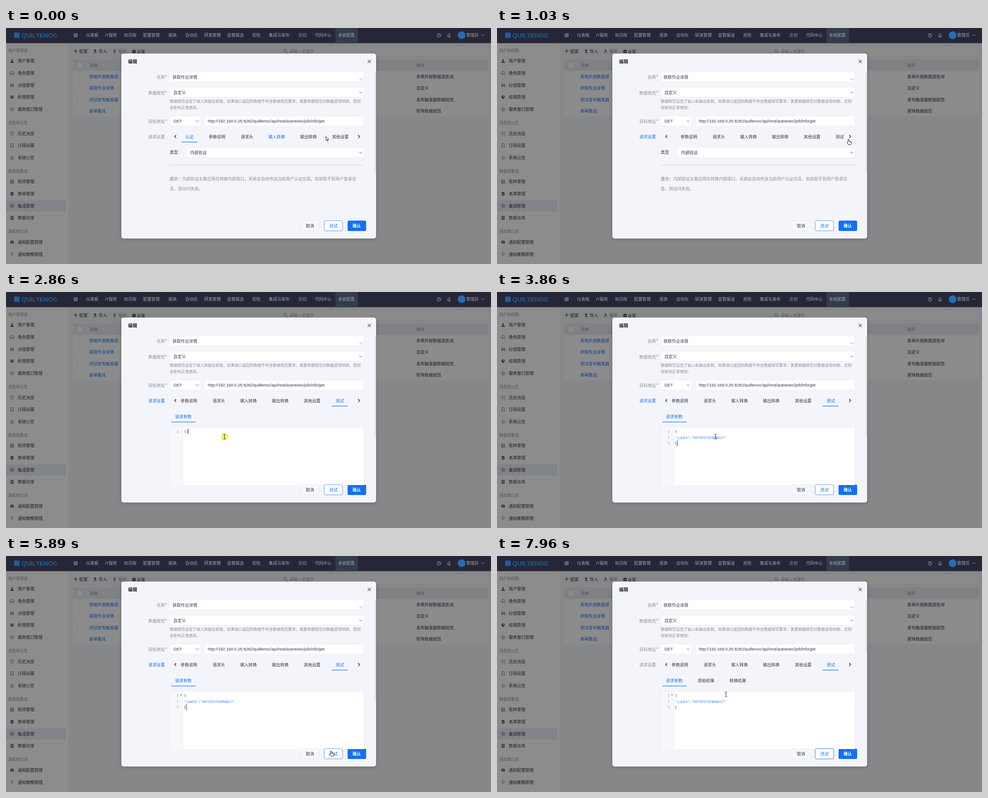
These frames come from a looping animation (1072 by 522 pixels, 8 s). An HTML page:

```html
<!DOCTYPE html>
<html lang="zh">
<head>
<meta charset="utf-8">
<style>
html, body { margin: 0; width: 100%; height: 100%; overflow: hidden; }
svg { display: block; width: 1072px; height: 522px; }
text { font-family: "Liberation Sans", "Noto Sans CJK SC", "Noto Sans CJK", sans-serif; white-space: pre; }
.mono { font-family: "DejaVu Sans Mono", monospace; }
</style>
</head>
<body>
<svg viewBox="0 0 1072 522">
  <defs>
    <filter id="shadow" x="-10%" y="-10%" width="120%" height="120%">
      <feDropShadow dx="0" dy="2" stdDeviation="4" flood-opacity=".2"/>
    </filter>
    <clipPath id="tabClip"><rect x="384.5" y="228" width="385" height="28"/></clipPath>
  </defs>
  <g id="backdrop"></g>
  <g id="live"></g>
</svg>
<script>
const LOOP = 8000, BLUE = '#1670f0', INK = '#33363c', GRAY = '#8b8e95', DIM = '#1c1d20';

// Drawing helpers; text is placed by its left edge and vertical middle
const text = (x, y, str, fill = INK, size = 9.17, extra = '') =>
  `<text x="${x}" y="${y + size * .37}" font-size="${size}" fill="${fill}" ${extra}>${str}</text>`;
const rect = (x, y, w, h, fill, r = 0, extra = '') =>
  `<rect x="${x}" y="${y}" width="${w}" height="${h}" rx="${r}" fill="${fill}" ${extra}/>`;
const line = (d, stroke, width = 1) =>
  `<path d="${d}" fill="none" stroke="${stroke}" stroke-width="${width}"/>`;
const shape = (d, fill, extra = '') => `<path d="${d}" fill="${fill}" ${extra}/>`;
const circle = (x, y, r, fill, extra = '') => `<circle cx="${x}" cy="${y}" r="${r}" fill="${fill}" ${extra}/>`;
const at = (x, y, body) => `<g transform="translate(${x} ${y})">${body}</g>`;
const fade = (opacity, body) => opacity > 0 ? `<g opacity="${opacity}">${body}</g>` : '';
const field = (x, y, w) => rect(x, y, w, 22.5, '#fff', 3, 'stroke="#e6e8ef" stroke-width=".7"');
const down = (x, y, color = '#555') => line(`M${x - 3} ${y - 1.5}l3 3 3-3`, color);
const bold = 'font-weight="bold"';

// Timing helpers
const ramp = (t, from, to) => Math.min(1, Math.max(0, (t - from) / (to - from)));
const ease = k => k < .5 ? 2 * k * k : 1 - 2 * (1 - k) ** 2;
const during = (t, from, to) => t >= from && t < to;
const mix = (a, b, k) => `color-mix(in srgb, ${a}, ${b} ${k * 100}%)`;

const dots = [-4, -1, 2].map(y => [-4, -1, 2].map(x => `M${x} ${y}h2v2h-2z`).join('')).join('');
const bell = 'M-3.3 2.4C-2 1-2.6-3.5 0-3.5S2 1 3.3 2.4zM-1 4H1';
const ring = r => `M${-r} 0a${r} ${r} 0 1 0 ${2 * r} 0a${r} ${r} 0 1 0 ${-2 * r} 0`;
const solid = d => shape(d, '#34363a');
const outline = d => line(d, '#34363a', .9);

const menu = [
  ['用户和权限'],
  ['用户管理', solid('M-1.9-2a1.9 1.9 0 1 0 3.8 0a1.9 1.9 0 1 0-3.8 0M-4 4c0-5 8-5 8 0z')],
  ['角色管理', outline('M-4 2.5a2 2 0 0 1 1-3.5a3 2.6 0 0 1 6 0a2 2 0 0 1 1 3.5zM-1.5 2.5a1.5 1.5 0 0 1 3 0')],
  ['分组管理', solid('M-3.5-1.5a1.4 1.4 0 1 0 2.8 0a1.4 1.4 0 1 0-2.8 0M.7-1.5a1.4 1.4 0 1 0 2.8 0a1.4 1.4 0 1 0-2.8 0M-4.5 3c0-3.5 4.2-3.5 4.2 0zM.3 3c0-3.5 4.2-3.5 4.2 0z')],
  ['权限管理', solid('M0-4L3.5-2.7V0C3.5 2 2 3.3 0 4C-2 3.3-3.5 2-3.5 0V-2.7z') + shape('M0-2.5L2.3-1.7V0H0z', '#8c8c8c')],
  ['服务窗口管理', outline(ring(3.8) + 'M0-2.2V.3L1.5 1.5')],
  ['消息和公告'],
  ['历史消息', outline('M-4-3H4M-4 0H-1M-4 3H-1M.5 2.5L4-.5M1 4H4')],
  ['订阅设置', outline('M-2.8-3.8H2.8V3.8L0 2-2.8 3.8z')],
  ['系统公告', outline(bell)],
  ['数据和集成'],
  ['矩阵管理', solid(dots)],
  ['表单管理', solid('M-3.2-4H1L3.2-2V4H-3.2z') + line('M-1.5 0H1.5M-1.5 2H1.5', '#8c8c8c', .7)],
  ['集成管理', outline(ring(3.8) + ring(1.5))],
  ['数据仓库', solid('M-3.8-4H3.8V-2H-3.8zM-3.8-1H3.8V1H-3.8zM-3.8 2H3.8V4H-3.8z')],
  ['通知和订阅'],
  ['通知配置管理', solid('M-4-3H4V3H-4z') + line('M-4-2.5L0 .5 4-2.5', '#8c8c8c', .8)],
  ['通知策略管理', outline('M-1.3 2C-1.3.5-2.8.5-2.8-1.3a2.8 2.8 0 0 1 5.6 0C2.8.5 1.3.5 1.3 2zM-1 4H1')]
];

const header = [
  [177, '仪表板'], [219, 'IT服务'], [261, '知识库'], [303, '配置管理'], [359, '报表'], [396, '自动化'],
  [438, '研发管理'], [489, '监管报送'], [544, '巡检'], [581, '集成与发布'], [646, '灾切'],
  [683, '代码中心'], [734, '系统配置']
];

const rows = [
  ['表格外部数据源', '表单外部数据源查询'], ['获取作业详情', '自定义'],
  ['测试发布触发器', '发布触发器数据规范'], ['表单集成', '矩阵数据规范']
];

function drawPage() {
  const pale = '#a3a5ab', faint = '#45474b';
  const tray = arrow => shape(`${arrow}M-4 3H4V4H-4z`, DIM);
  return rect(0, 0, 1072, 522, '#868789') + rect(0, 33, 138, 489, '#8c8c8c') +
    rect(0, 0, 1072, 33.5, '#252736') + rect(728, 0, 50, 33.5, '#323c4b') +
    rect(18, 10, 12, 12, '#1f5c9e') + text(34, 16, 'QUILTENOC', '#1f5c9e', 13.7, bold) +
    at(154, 16, shape(dots, pale)) + header.map(([x, s]) => text(x, 16, s, pale)).join('') +
    circle(957, 16.5, 4, 'none', `stroke="${pale}"`) + text(957, 16.5, '?', pale, 7, 'text-anchor="middle"') +
    at(979, 16.5, line(bell, pale)) + circle(981, 12, 1.3, '#a34436') +
    circle(1007, 16, 8.5, '#2a6cae') + text(1017, 16, '管理员', pale) + down(1054, 16, pale) +
    rect(1, 381, 132, 25, '#808388', 3) +
    menu.map(([name, icon], i) => {
      const y = 46.3 + 26.7 * i;
      return icon ? at(13.5, y, icon) + text(26, y, name, DIM) : text(5, y + 3.4, name, '#505256', 8.6);
    }).join('') +
    line('M150 51H158M154 47V55', DIM, 1.2) + text(162, 51.5, '配置', DIM) +
    at(197, 51, tray('M0-4L3.5-.5H1V2H-1V-.5H-3.5z')) + text(205, 51.5, '导入', DIM) +
    `<g opacity=".7">${at(240, 51, tray('M0 2L3.5-1H1V-4H-1V-1H-3.5z'))}</g>` + text(248, 51.5, '导出', faint) +
    circle(283, 52, 2.6, 'none', `stroke="${DIM}" stroke-width="2"`) +
    circle(283, 52, 3.8, 'none', `stroke="${DIM}" stroke-dasharray="1.5 1.5"`) + text(289, 52.5, '设置', DIM) +
    rect(608, 40.5, 458, 22, '#8b8b8c', 3, 'stroke="#808185" stroke-width=".8"') +
    circle(617, 50.5, 3.2, 'none', 'stroke="#3f4145"') + line('M619.5 53l3 3', '#3f4145') +
    text(626, 51.5, '请输入关键字', '#5a5c60') +
    rect(148, 70, 918, 125, '#8b8b8c', 3) + rect(148, 70, 918, 25, '#808185', 3) +
    text(185, 82.5, '名称', '#4c4e52') + text(907, 82.5, '组件', '#4c4e52') +
    [82.5, 107.5, 133, 158, 183].map(y => rect(157.5, y - 5.5, 11, 11, '#8c8c8c', 2, 'stroke="#7e8084" stroke-width=".7"')).join('') +
    rows.map(([name, part], i) => {
      const y = 108 + 25.1 * i;
      return text(184, y, name, '#0e3f88') + text(907, y, part, DIM);
    }).join('');
}

function drawModal() {
  const label = (x, y, s) => text(x, y, s, GRAY) + text(352, y - 2, '*', '#6c6f76');
  return rect(255, 56.5, 563, 409, '#f4f5fa', 5, 'filter="url(#shadow)"') +
    text(270, 74.5, '编辑', '#222', 9.9, bold) + line('M799.5 70.5l7 7m0-7l-7 7', '#555', 1.1) +
    label(333, 109, '名称') + label(314.5, 143.5, '数据规范') + label(314.5, 206.5, '目标地址') +
    field(362.5, 97, 429) + text(368, 109, '获取作业详情') + text(780.5, 113, '44', '#bcbec4', 7.5) +
    field(362.5, 131, 429) + text(370, 142.5, '自定义') + down(784, 142.5) +
    text(362, 161.5, '数据规范设定了输入和输出参数，如果接口返回的数据不符合数据规范要求，需要根据规范对数据进项转换，否则', GRAY, 8.45) +
    text(362, 175.5, '会影响正常使用。', GRAY, 8.45) +
    field(362.5, 194.5, 68) + text(370, 206, 'GET') + down(422.5, 206) +
    field(439.5, 194.5, 352) + text(446, 206, 'http://192.168.0.25:8282/quiltenoc/api/rest/autoexec/job/info/get') +
    line('M376 236.8l-3.2 3.2 3.2 3.2M778.5 236.8l3.2 3.2-3.2 3.2', '#222', 1.3) +
    rect(755, 426, 41, 23, BLUE, 3) + text(766, 437.5, '确认', '#fff', 9.17, bold);
}

const tabs = [
  [396, '认证'], [448.3, '参数说明'], [519, '请求头'], [580, '输入转换'],
  [650, '输出转换'], [720.7, '其他设置'], [790.8, '测试']
];

function drawTabs(t) {
  const shift = -62.3 * ease(ramp(t, 730, 1230));
  const active = {
    认证: 1 - ramp(t, 1650, 1750),
    输入转换: 1 - ramp(t, 0, 300),
    其他设置: ramp(t, 130, 260) - ramp(t, 320, 480),
    测试: ramp(t, 1560, 1700)
  };
  const bar = x => rect(x, 251.8, 35.5, 1.2, BLUE);
  const labelBlue = ramp(t, 640, 840) - ramp(t, 6490, 6640);
  return text(314.5, 240.5, '请求设置', mix(GRAY, BLUE, labelBlue)) +
    '<g clip-path="url(#tabClip)">' + at(shift, 0,
      tabs.map(([x, s]) => text(x, 240.5, s, mix(INK, BLUE, active[s] || 0))).join('') +
      bar(388) + fade(ramp(t, 1800, 1950), bar(782))) + '</g>';
}

const drawAuth = () => text(362, 275, '类型') + field(399.5, 264, 392) + text(407, 275.5, '内部验证') +
  line('M362 303.5H791.5', '#d6d8e0') +
  text(362, 333.5, '提示：', '#6f7279') +
  text(389.5, 333.5, '内部验证主要应用在转换内部接口，系统会自动传送当前用户认证信息。如获取不到用户登录信', GRAY) +
  text(362, 355.5, '息，则访问失败。', GRAY);

function drawEditor(t) {
  const code = (x, y, s, fill = INK) => text(x, y, s, fill, 7.48, 'class="mono"');
  const caret = (x, y) => rect(x, y - 6.5, 1, 13, '#222');
  const pasted = t >= 3860;
  const blinkOn = t < 4410 || during(t, 4870, 5370) || during(t, 5870, 5960);
  let out = text(373.5, 275.5, '请求参数', BLUE) + rect(365, 286.9, 54, 1.2, BLUE) +
    rect(362.5, 298.5, 429, 128.5, '#fff') + rect(362.5, 298.5, 28, 128.5, '#f7f8fa') +
    line('M362.5 427V298.5H791.5V427M390.5 298.5V427', '#e4e6ed', .7);
  if (t >= 7290) out += text(444, 275.5, '原始结果') + text(514, 275.5, '转换结果');
  out += [1, 2, 3].slice(0, pasted ? 3 : 1).map(n => code(377, 294.7 + 13.2 * n, n, '#999')).join('');
  if (!pasted) {
    if (t >= 2930) out += rect(393.5, 301, 9, 13.5, '#d7d4f0');
    out += code(393.7, 308, '{}');
    if (during(t, 2860, 2930)) out += caret(402.3, 308);
    return out;
  }
  out += code(393.7, 308, '{') + code(392.7, 334.6, '}') +
    code(393.5, 321.8, `"jobId"<tspan fill="${INK}">:</tspan>"997955792068617"`, '#2a7fe8');
  if (t >= 4260) out += shape('M385 306.3h4l-2 2.5z', '#777');
  if (blinkOn && t < 5960) out += caret(398, 334.5);
  return out;
}

function drawFooter(t) {
  const loading = during(t, 6490, 7290), focused = t >= 5960;
  const left = loading ? 674.4 : 703.4, edge = loading ? '#8ab7f7' : BLUE;
  const cancel = left - 51.7, width = 743.8 - left;
  return rect(cancel, 426.3, 40.5, 22.4, '#f7f8fc', 3, 'stroke="#e6e8ef" stroke-width=".7"') +
    text(cancel + 11, 437.5, '取消') +
    (focused ? rect(left - 1, 425.3, width + 2, 24.4, 'none', 4, 'stroke="#c3daf9" stroke-width="1.3"') : '') +
    rect(left, 426.3, width, 22.4, '#fff', 3, `stroke="${edge}" stroke-width=".7"`) +
    (loading
      ? at(690.5, 437, `<g transform="rotate(${t * .36})">${line('M0-3.8A3.8 3.8 0 1 1-3.8 0', edge)}</g>`) +
        text(697.5, 437.5, '执行中...', edge)
      : text(714.5, 437.5, '测试', BLUE));
}

// Pointer path: [time, x, y]
const path = [
  [0, 707, 240], [70, 709, 240.5], [480, 777, 246], [1500, 777, 246], [1640, 738.5, 239], [1850, 738.5, 239],
  [2310, 531, 302], [2440, 483, 320], [5110, 483, 320], [5890, 718.5, 431], [5960, 718.5, 437],
  [7580, 718.5, 437], [7940, 506, 306], [LOOP, 506, 306]
];
const pointers = {
  arrow: shape('M0 0V9L2.1 7 3.6 10.4 5 9.8 3.6 6.5H6.5z', '#fff', 'stroke="#111" stroke-width=".9"'),
  hand: shape('M-1.1 1a1.1 1.1 0 0 1 2.2 0V4.5Q5 4.5 6.3 6V9L5 12H0L-3.7 7.5Q-3.5 6-1.1 7.5z', '#fff',
    'stroke="#111" stroke-width=".9"') + line('M2.7 5V7M4.5 5.5V7.2', '#111', .6),
  beam: line('M-2.5-5H-.6L0-4.5 .6-5H2.5M0-4.5V4.5M-2.5 5H-.6L0 4.5 .6 5H2.5', '#222')
};
const pointerTimes = [
  [400, 'arrow'], [1900, 'hand'], [2290, 'arrow'], [5780, 'beam'], [6490, 'hand'], [7640, 'arrow'], [LOOP + 1, 'beam']
];

function drawPointer(t) {
  const i = path.findIndex(p => p[0] > t);
  const [t0, x0, y0] = path[i - 1], [t1, x1, y1] = path[i];
  const k = ease(ramp(t, t0, t1));
  const pressed = during(t, 640, 760) || during(t, 1650, 1730) || during(t, 2860, 3160) || during(t, 5960, 6120);
  return at(x0 + (x1 - x0) * k, y0 + (y1 - y0) * k,
    (pressed ? circle(0, 0, 8.3, '#fbf04a', 'opacity=".85"') : '') + pointers[pointerTimes.find(p => t < p[0])[1]]);
}

const live = document.getElementById('live');
document.getElementById('backdrop').innerHTML = drawPage() + drawModal();

function render(now) {
  const t = now % LOOP;
  live.innerHTML = rect(814.5, 96, 3.5, t < 7640 ? 224 : 120, '#e3e4e8', 1) +
    drawTabs(t) + fade(1 - ramp(t, 1600, 1745), drawAuth()) + (t < 1800 ? down(784, 275.5) : '') +
    fade(ramp(t, 1830, 2000), drawEditor(t)) + drawFooter(t) + drawPointer(t);
  requestAnimationFrame(render);
}
requestAnimationFrame(render);
</script>
</body>
</html>
```
